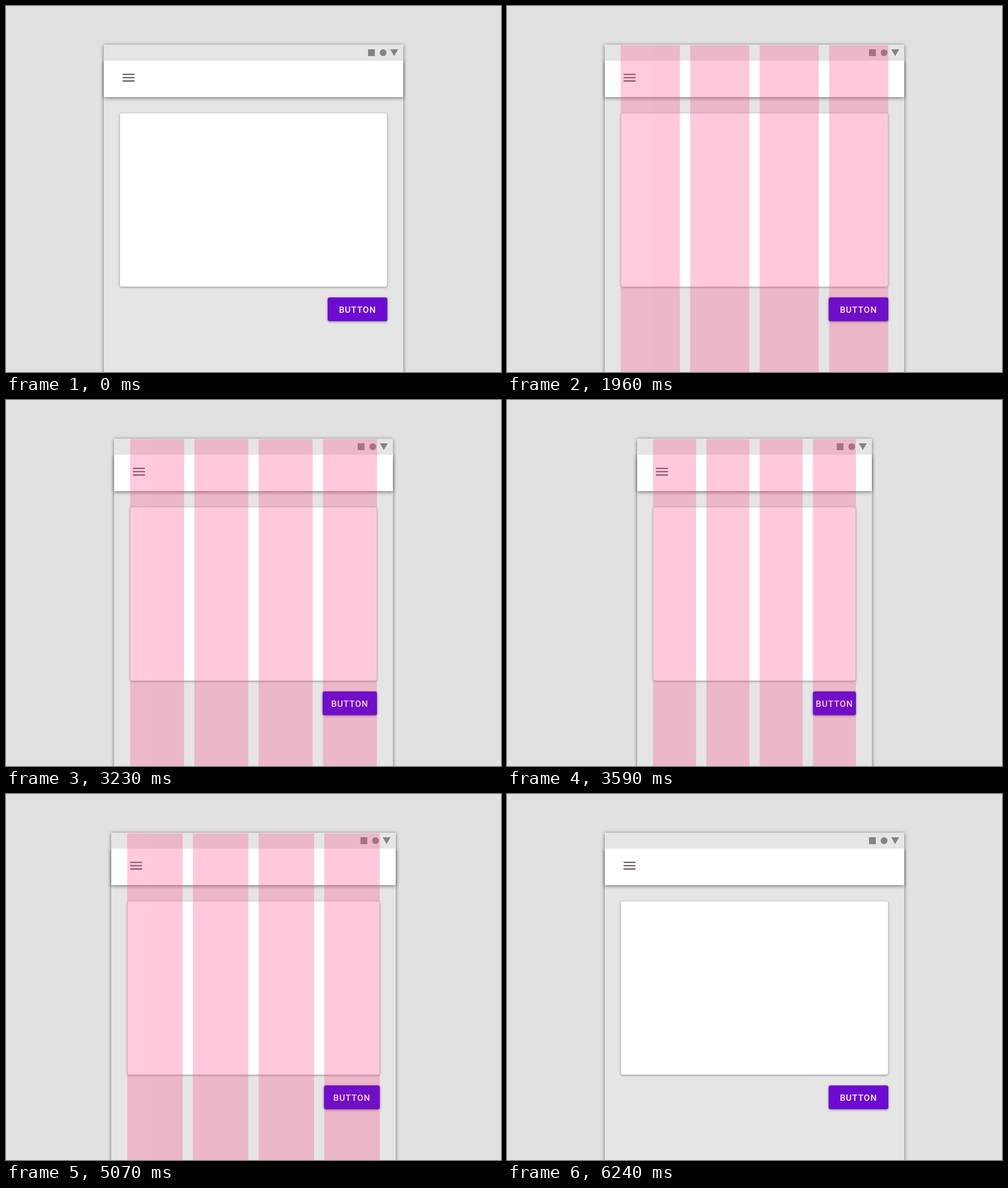
Recreate the animation shown at these times as an HTML page. Size 871 by 643 pixels, loop 6.27 s.

```html
<!DOCTYPE html>
<html lang="en">
<head>
<meta charset="utf-8">
<title>Responsive columns</title>
<style>
  html, body { margin: 0; width: 100%; height: 100%; overflow: hidden; background: #e1e1e1; }
  svg { display: block; width: 100%; height: 100%; }
  #phone { fill: #e5e5e5; filter: drop-shadow(0 1px 3px rgba(0, 0, 0, .54)); }
  #bar { fill: #fff; filter: drop-shadow(0 2px 3px rgba(0, 0, 0, .46)); }
  #status { fill: #e5e5e5; }
  #card { fill: #fff; filter: drop-shadow(0 1px 2px rgba(0, 0, 0, .4)); }
  #button { filter: drop-shadow(0 1.5px 2px rgba(0, 0, 0, .42)); }
  #menu { fill: #706066; }
  #icons { fill: #858484; }
  #columns { fill: #ff4985; }
  #label { font: 500 15.4px Roboto, sans-serif; letter-spacing: .95px; text-anchor: middle; }
</style>
</head>
<body>
<svg viewBox="0 0 871 643">
  <rect width="871" height="643" fill="#e1e1e1"/>
  <rect id="phone" y="68" height="620"/>
  <rect id="bar" y="96" height="64"/>
  <rect id="status" y="68" height="28"/>
  <path id="menu" d="M0 118.9h21v2.4h-21zM0 124.7h21v2.4h-21zM0 130.6h21v2.4h-21z"/>
  <g id="icons">
    <rect x="-62" y="76" width="12" height="12"/>
    <circle cx="-35.5" cy="82" r="6"/>
    <path d="M-23 76h14l-7 12z"/>
  </g>
  <rect id="card" y="188.5" height="304.5" rx="4"/>
  <g id="columns">
    <rect y="69" height="574"/>
    <rect y="69" height="574"/>
    <rect y="69" height="574"/>
    <rect y="69" height="574"/>
  </g>
  <rect id="button" y="512" height="41.7" rx="3.5"/>
  <text id="label" y="538.9">BUTTON</text>
</svg>
<script>
const LOOP = 6270, MARGIN = 28, GUTTER = 18, TINT = 0.29;
const $ = id => document.getElementById(id);
const columns = [...$('columns').children];

const progress = (t, start, length) => Math.min(1, Math.max(0, (t - start) / length));
const easeInOut = p => p < 0.5 ? 16 * p ** 5 : 1 - 16 * (1 - p) ** 5;
const mix = (a, b, k) => `rgb(${a.map((v, i) => Math.round(v + (b[i] - v) * k))})`;

function span(el, x, width) {
  el.setAttribute('x', x);
  el.setAttribute('width', width);
}

function shift(el, x) {
  el.setAttribute('transform', `translate(${x} 0)`);
}

function draw(t) {
  const narrow = easeInOut(progress(t, 2847, 840)) - easeInOut(progress(t, 4557, 900));
  const grid = t < 3000 ? progress(t, 970, 990) ** 5 : (1 - progress(t, 5290, 950)) ** 4;

  const left = 172 + 57 * narrow, right = 699 - 57 * narrow;
  for (const id of ['phone', 'bar', 'status']) span($(id), left, right - left);
  shift($('menu'), left + 33.2);
  shift($('icons'), right);

  const x0 = left + MARGIN, inner = right - left - 2 * MARGIN;
  span($('card'), x0 + 0.5, inner - 1);

  const width = (inner - 3 * GUTTER) / 4;
  columns.forEach((col, i) => span(col, x0 + i * (width + GUTTER), width));
  $('columns').setAttribute('opacity', TINT * grid);

  const extra = 0.8 * (1 - narrow);
  const buttonX = x0 + 3 * (width + GUTTER) - extra;
  span($('button'), buttonX, width + extra);
  $('button').setAttribute('fill', mix([109, 10, 210], [112, 14, 200], grid));
  $('label').setAttribute('x', buttonX + (width + extra) / 2);
  $('label').setAttribute('fill', mix([255, 255, 255], [255, 73, 133], grid * TINT * (0.5 + 0.5 * narrow)));
}

function frame() {
  draw(performance.now() % LOOP);
  requestAnimationFrame(frame);
}
frame();
</script>
</body>
</html>
```
